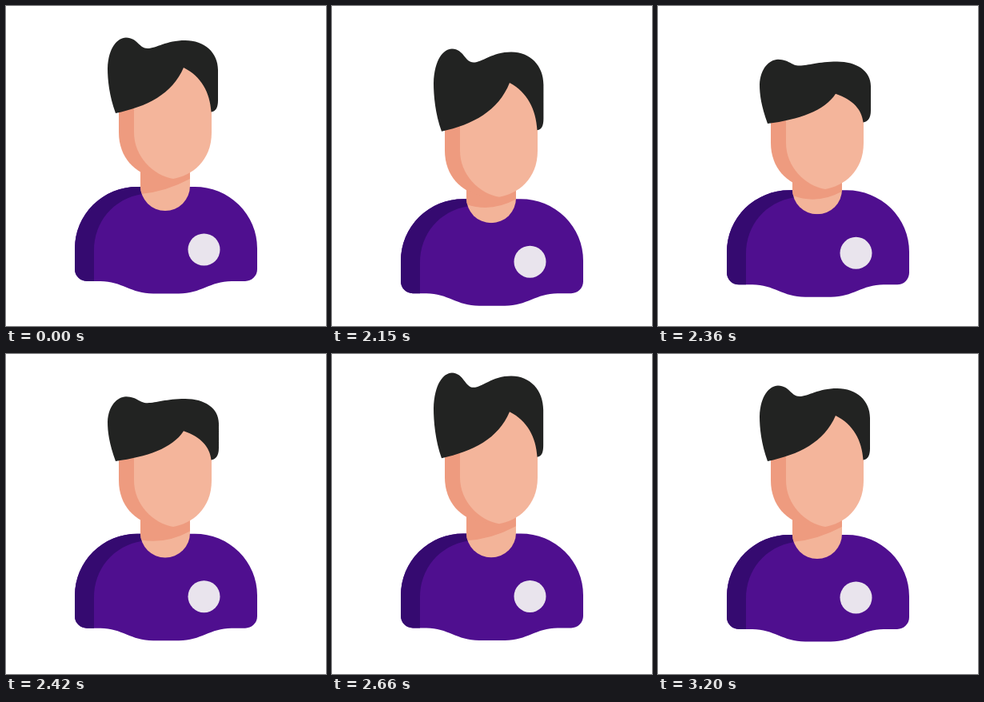
An HTML page that plays this animation: 400x400 px, repeating every 3230 ms.

```html
<!DOCTYPE html>
<html lang="en">
<head>
<meta charset="utf-8">
<title>Avatar bounce</title>
<style>
  html, body { margin: 0; height: 100%; overflow: hidden; background: #fff; }
  svg { display: block; width: 100%; height: 100%; }
</style>
</head>
<body>
<svg viewBox="0 0 400 400">
  <clipPath id="neckClip"><path d="M168 180V225A31 31 0 0 0 230 225V180Z"/></clipPath>
  <g id="body">
    <path fill="#4f0f8f" d="M86 303A78 77 0 0 1 164 226H236A78 77 0 0 1 314 303V329A15 15 0 0 1 299 344H282C255 344 244 359.5 216 359.5H184C156 359.5 145 344 118 344H101A15 15 0 0 1 86 329Z"/>
    <path fill="#350a70" d="M86 303A78 77 0 0 1 164 226H200V235H170C134 241 110 270 110 306V344H101A15 15 0 0 1 86 329Z"/>
    <circle cx="247.5" cy="304.5" r="20" fill="#e9e4ed"/>
    <g clip-path="url(#neckClip)">
      <path fill="#f3b499" d="M168 180H230V260H168Z"/>
      <path id="shade" fill="#ee9b7f"/>
    </g>
  </g>
  <g id="head">
    <path fill="#ee9b7f" d="M141 110V158C141 190 162 209 185 214L209 216V110Z"/>
    <path fill="#f4b59b" d="M160 110V158C160 188 184 212 209 216C232 212 257 194 257 158V100L235 70H205Z"/>
    <path id="hair" fill="#222322"/>
  </g>
</svg>
<script>
const LOOP = 3230, REST = 2030, STEP = 30, SWING = 300;

// Ease from rest through each height in turn and back to rest
function swing(t, start, peak, ...heights) {
  let from = 0, begin = start, end = peak;
  for (const to of [...heights, 0]) {
    if (t < end) {
      const u = Math.max(0, (t - begin) / (end - begin));
      return from + (to - from) * (1 - Math.cos(Math.PI * u)) / 2;
    }
    from = to;
    begin = end;
    end += SWING;
  }
  return 0;
}

// top: shift of the crown, fringe: shift of the parting, both relative to the head
function hairPath(top, fringe) {
  const crown = (y, weight) => y + top * weight;
  const front = y => y + fringe * (134 - y) / 57;
  const side = 265 + top * .07;
  return `M137 134C129 112 127 ${crown(92, .4)} 127 ${crown(78, .5)}
    C128 ${crown(52, .9)} 139 ${crown(40, 1)} 150 ${crown(39.5, 1)}
    C165 ${crown(40, 1)} 166 ${crown(53, .6)} 177 ${crown(53, .6)}
    C188 ${crown(53, .6)} 200 ${crown(43, .95)} 224 ${crown(43, .95)}
    C248 ${crown(43, .95)} ${side} ${crown(58, .7)} ${side} ${crown(80, .5)}
    V118C${side} 127 262 132 256.5 132.5
    C255 ${front(108)} 244 ${front(88)} 222 ${front(77)}
    C208 ${front(110)} 176 ${front(126)} 137 134Z`;
}

// Shadow of the chin on the neck
function shadePath(sag) {
  const left = 235 - sag * .3, right = 216 + sag * 1.4;
  const control = 2 * (229 + sag) - (left + right) / 2;
  return `M168 180V${left}Q199 ${control} 230 ${right}V180Z`;
}

const set = (id, name, value) => document.getElementById(id).setAttribute(name, value);

function draw(now) {
  const time = now % LOOP;
  const t = time < REST ? 0 : REST + Math.floor((time - REST) / STEP) * STEP;
  const body = swing(t, 2000, 2190, 17, -4);
  const head = swing(t, 2030, 2220, 32.5, -11, 5);
  const crown = swing(t, 2030, 2295, 33, -19, 7);
  const parting = swing(t, 2030, 2280, 40.5, -7, 7);
  set("body", "transform", `translate(0 ${body})`);
  set("head", "transform", `translate(0 ${head})`);
  set("hair", "d", hairPath(crown - head, parting - head));
  set("shade", "d", shadePath(swing(t, 2030, 2240, 12, 1)));
  requestAnimationFrame(draw);
}
draw(0);
</script>
</body>
</html>
```
